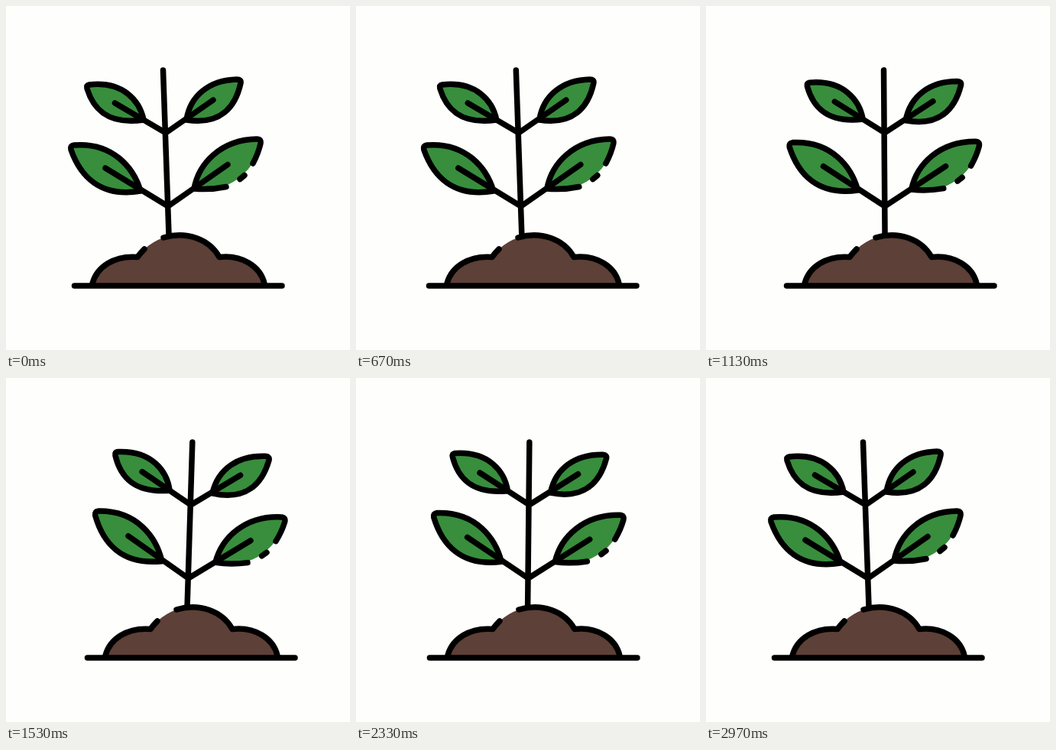
Recreate the animation shown at these times as an HTML page. Size 450 by 450 pixels, loop 3010 ms.

```html
<!DOCTYPE html>
<html lang="en">
<head>
<meta charset="utf-8">
<title>Swaying seedling</title>
<style>
  html, body { margin: 0; height: 100%; overflow: hidden; background: #fefefd; }
  svg { display: block; width: 100%; height: 100%; }
  .line { fill: none; stroke: #000; stroke-width: 7.5; stroke-linecap: round; stroke-linejoin: round; }
  .leaf { fill: #388e3c; }
  .soil { fill: #5d4037; }
</style>
</head>
<body>
<svg viewBox="0 0 450 450">
  <g id="plant">
    <path class="line leaf" d="M180 149C175 124 153 98 109 103Q105 104 106 108C114 134 132 156 180 149Z"/>
    <path class="line leaf" d="M236 149C241 117 266 97 302 96Q308 96 307 101C300 133 280 156 236 149Z"/>
    <path class="line leaf" d="M176 242C167 212 140 178 89 182Q84 183 85 188C97 222 123 251 176 242Z"/>
    <path class="leaf" d="M246 239C252 206 281 175 328 174Q334 174 333 180C326 216 290 247 246 239Z"/>
    <path class="line" d="M288 236.500Q266 241 246 239C252 206 281 175 328 174Q334 174 333 180Q330 193 323 206M306 226.500L312 221.500"/>
    <path class="line" d="M205.500 84L213 299M142.500 127L209 166L271 123M130 212L212 262L290 207.500"/>
  </g>
  <g id="ground">
    <path class="soil" d="M113 364C119 341 142 326 172 328.500Q176 323 181 318Q192 308 206 303C236 294 266 305 279 328.500C309 325 333 341 338 364Z"/>
    <path class="line" d="M113 363C119 341 142 326 172 328.500Q176 323 181 318M206 303C236 294 266 305 279 328.500C309 325 333 341 338 363M89.500 366H361"/>
  </g>
</svg>
<script>
  const LOOP = 3010, STEP = LOOP / 90;
  const plant = document.getElementById('plant');
  const ground = document.getElementById('ground');

  const ease = u => u < 0.5 ? 4 * u ** 3 : 1 - 4 * (1 - u) ** 3;
  const ramp = (t, from, to) => ease(Math.min(1, Math.max(0, (t - from) / (to - from))));
  // Rises 0 to 1 between a and b, falls back between c and d
  const swing = (t, a, b, c, d) => ramp(t, a, b) - ramp(t, c, d);

  const start = performance.now();
  function draw() {
    const time = (performance.now() - start) % LOOP;
    // Steps begin slightly early, as their times are rounded down to 10 ms
    const t = Math.floor((time + 9) / STEP) * STEP;
    const groundX = 17 * swing(t, 0, 1505, 1505, LOOP);
    const plantX = 24 * swing(t, 205, 1565, 1640, 2960);
    const tilt = 3.9 * swing(t, 595, 1755, 1760, LOOP);
    ground.setAttribute('transform', `translate(${groundX})`);
    plant.setAttribute('transform', `translate(${plantX}) rotate(${tilt} 213 300)`);
    requestAnimationFrame(draw);
  }
  draw();
</script>
</body>
</html>
```
